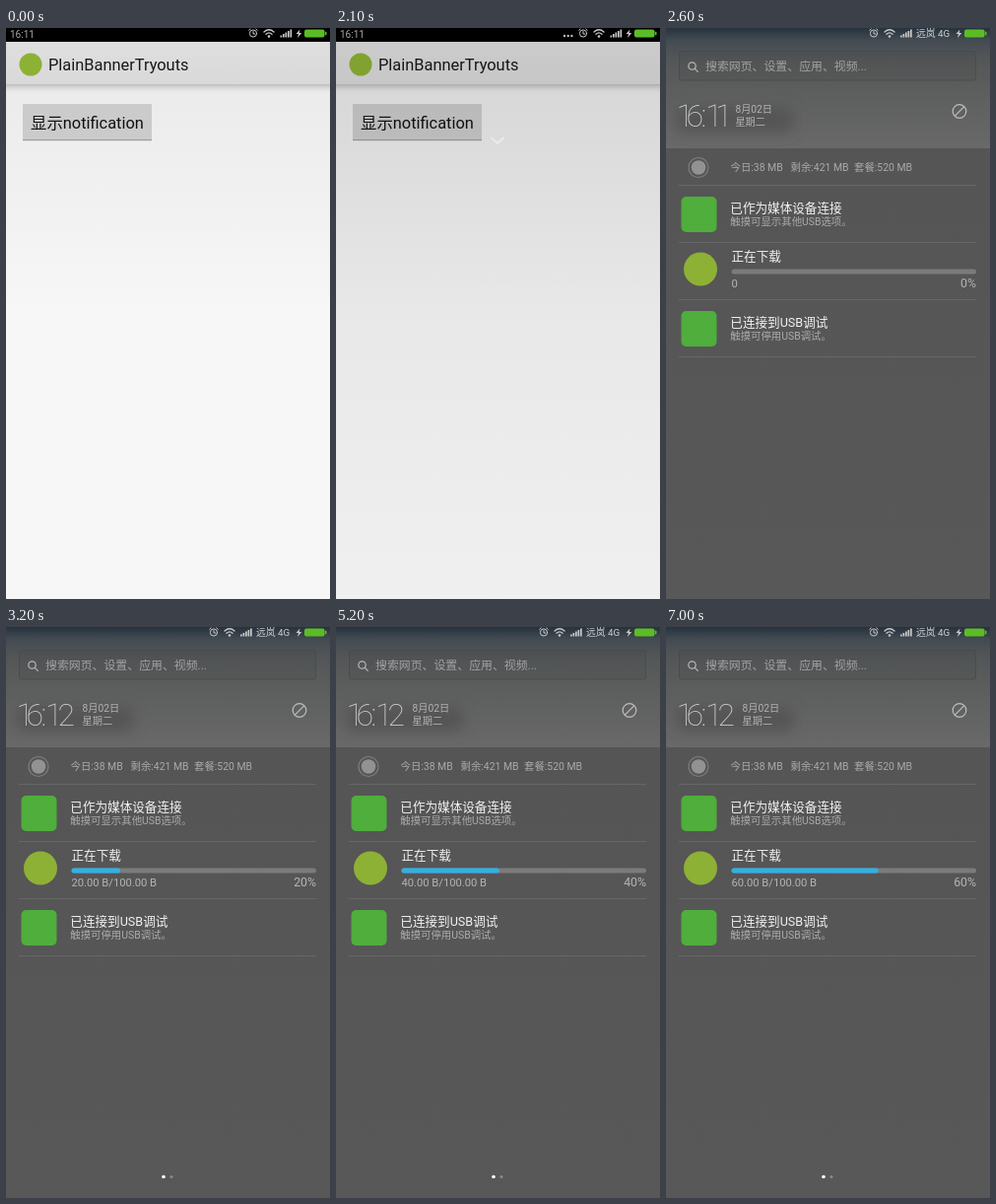
Animation, 329 px wide and 579 px high, one loop 8 s. Source, as an HTML page:

```html
<!DOCTYPE html>
<html lang="zh-CN">
<head>
<meta charset="utf-8">
<title>Notification shade</title>
<style>
  html, body { margin: 0; width: 100%; height: 100%; overflow: hidden; background: #f7f7f7; }
  svg { display: block; width: 100%; height: 100%; }
  text { font-family: Roboto, "Noto Sans CJK SC", "Noto Sans CJK", sans-serif; white-space: pre; }
  .head { font-size: 12.6px; fill: #f2f2f2; }
  .sub { font-size: 10.4px; fill: #fff; fill-opacity: .5; }
  .date { font-size: 10.2px; fill: #b2b2b2; }
  .clock { font-size: 32px; font-weight: 100; fill: #d2d2d2; }
  .line { fill: none; stroke-linecap: round; stroke-linejoin: round; }
</style>
</head>
<body>
<svg viewBox="0 0 329 579" preserveAspectRatio="none">
  <defs>
    <linearGradient id="page" x2="0" y2="1">
      <stop offset="0" stop-color="#e8e8e8"/><stop offset=".5" stop-color="#f7f7f7"/>
    </linearGradient>
    <linearGradient id="title" x2="0" y2="1">
      <stop offset="0" stop-color="#dfdfdf"/><stop offset="1" stop-color="#d9d9d9"/>
    </linearGradient>
    <linearGradient id="drop" x2="0" y2="1">
      <stop offset="0" stop-color="#bdbdbd"/><stop offset="1" stop-color="#e8e8e8" stop-opacity="0"/>
    </linearGradient>
    <linearGradient id="dimming" x2="0" y2="1">
      <stop offset="0" stop-opacity=".09"/><stop offset="1" stop-opacity=".03"/>
    </linearGradient>
    <linearGradient id="topShade" x2="0" y2="1">
      <stop offset="0" stop-color="#263441"/><stop offset="1" stop-color="#424c54"/>
    </linearGradient>
    <linearGradient id="headerFill" x2="0" y2="1">
      <stop offset="0" stop-color="#26323d"/><stop offset=".1" stop-color="#434b52"/>
      <stop offset=".25" stop-color="#535657"/><stop offset=".5" stop-color="#5c5d5d"/>
      <stop offset="1" stop-color="#696969"/>
    </linearGradient>
    <linearGradient id="panelFill" x2="0" y2="1">
      <stop offset="0" stop-color="#555"/><stop offset="1" stop-color="#585858"/>
    </linearGradient>
    <filter id="smudge" x="-50%" y="-100%" width="200%" height="300%"><feGaussianBlur stdDeviation="7"/></filter>
    <filter id="soft"><feGaussianBlur stdDeviation=".6"/></filter>

    <g id="alarm" class="line" stroke="#c8c8c8">
      <circle r="3.6"/><path d="M0-2V.5H1.8M-4.2-3.2L-2.8-4.5M4.2-3.2L2.8-4.5"/>
    </g>
    <g id="wifi" class="line" stroke="#c8c8c8" stroke-width="1.3">
      <path d="M-5-1.5Q0-6 5-1.5M-3 .8Q0-2 3 .8"/><circle cy="3" r=".7" fill="#c8c8c8"/>
    </g>
    <path id="signal" fill="#c8c8c8" d="M-6 2h1.7v2h-1.7zM-3.5 .5h1.7v3.5h-1.7zM-1-1h1.7v5h-1.7zM1.5-2.5h1.7v6.5h-1.7zM4-4h1.7v8h-1.7z"/>
    <g id="power">
      <path d="M298.5 1.5l-4 4.5h2.5l-1 4 4.3-5h-2.6z" fill="#c8c8c8"/>
      <rect x="303" y="1.5" width="20.5" height="8" rx="2" fill="#5bbd25"/>
      <rect x="324" y="3.8" width="1.5" height="3.4" fill="#5bbd25"/>
    </g>
  </defs>

  <g id="app">
    <rect width="329" height="579" fill="url(#page)"/>
    <rect y="57" width="329" height="10" fill="url(#drop)"/>
    <rect y="14" width="329" height="43" fill="url(#title)"/>
    <circle cx="25" cy="37" r="11.5" fill="#8db135"/>
    <text x="43" y="43" font-size="16.4" fill="#181818">PlainBannerTryouts</text>
    <rect x="17" y="77" width="131" height="37" rx="1" fill="#cbcbcb"/>
    <rect x="17" y="113" width="131" height="1.2" fill="#9c9c9c"/>
    <text x="25" y="102" font-size="16.4" fill="#111">显示notification</text>
    <rect id="dim" width="329" height="579" fill="url(#dimming)"/>
    <g id="statusBar">
      <rect width="329" height="14"/>
      <text x="4" y="9.5" font-size="10" fill="#aaa">16:11</text>
      <g id="more" fill="#bbb">
        <circle cx="232" cy="8" r="1.2"/><circle cx="235.7" cy="8" r="1.2"/><circle cx="239.4" cy="8" r="1.2"/>
      </g>
      <use href="#alarm" x="251" y="5.5"/>
      <use href="#wifi" x="267" y="5.5"/>
      <use href="#signal" x="284.5" y="5.5"/>
      <use href="#power"/>
    </g>
  </g>

  <g id="veil">
    <rect width="329" height="579" fill="#5a5a5a" opacity=".75"/>
    <rect width="329" height="14" fill="url(#topShade)"/>
  </g>

  <g id="panel">
    <rect width="329" height="122" fill="url(#headerFill)"/>
    <rect x="10" y="80" width="120" height="26" rx="10" fill="#555" filter="url(#smudge)"/>
    <rect y="122" width="329" height="457" fill="url(#panelFill)"/>
    <use href="#alarm" x="211" y="5.5"/>
    <use href="#wifi" x="227" y="5.5"/>
    <use href="#signal" x="244" y="5.5"/>
    <text x="254" y="9.3" font-size="9.8" fill="#d0d0d0">远岚 4G</text>
    <use href="#power"/>
    <rect x="13.5" y="23.5" width="301" height="29.5" rx="2" fill="#000" fill-opacity=".04" stroke="#464a48" stroke-opacity=".75"/>
    <g class="line" stroke="#b8b8b8" stroke-width="1.2"><circle cx="26.5" cy="38.5" r="3.7"/><path d="M29.3 41.3l3 3"/></g>
    <text x="40" y="42.6" font-size="11.9" fill="#a2a2a2">搜索网页、设置、应用、视频...</text>
  </g>

  <g id="shade">
    <text id="clock" class="clock" y="100"></text>
    <g id="date" class="date"><text y="86">8月02日</text><text y="98.5">星期二</text></g>
    <g class="line" stroke="#bdbdbd" stroke-width="1.2"><circle cx="298" cy="84.5" r="6.8"/><path d="M293.4 89.1l9.2-9.2"/></g>
    <path d="M13 159.5H315M13 217.5H315M13 275.5H315M13 333.5H315" stroke="#fff" stroke-opacity=".1"/>
    <circle cx="33" cy="141.5" r="10" fill="none" stroke="#7d7d7d" stroke-width="1.2"/>
    <circle cx="33" cy="141.5" r="7.3" fill="#929292"/>
    <g class="sub">
      <text x="65.5" y="145.3">今日:38 MB</text><text x="126.5" y="145.3">剩余:421 MB</text><text x="191" y="145.3">套餐:520 MB</text>
    </g>
    <rect x="15.5" y="171" width="36" height="36" rx="5" fill="#4fae3c"/>
    <text class="head" x="65.3" y="187.3">已作为媒体设备连接</text>
    <text class="sub" x="65.3" y="200.3">触摸可显示其他USB选项。</text>
    <circle cx="35" cy="244.5" r="17" fill="#8db135"/>
    <text class="head" x="66.5" y="236.3">正在下载</text>
    <rect x="66.5" y="244.5" width="248.5" height="5" rx="2.5" fill="#7b7b7b"/>
    <rect id="bar" x="66.5" y="244.5" height="5" rx="2.5" fill="#30b1e3"/>
    <g fill="#b4b4b4">
      <text id="bytes" x="66.5" y="263" font-size="11.2"></text>
      <text id="percent" x="315" y="263" font-size="12.3" text-anchor="end"></text>
    </g>
    <rect x="15.5" y="287" width="36" height="36" rx="5" fill="#4fae3c"/>
    <text class="head" x="65.3" y="303">已连接到USB调试</text>
    <text class="sub" x="65.3" y="316">触摸可停用USB调试。</text>
  </g>

  <path id="handle" class="line" d="M-6-2.5L0 3L6-2.5" stroke="#fff" stroke-opacity=".45" stroke-width="2"/>
  <g id="pages"><circle cx="160" cy="557.5" r="1.8" fill="#fff"/><circle cx="168" cy="557.5" r="1.5" fill="#8c8c8c"/></g>
</svg>
<script>
const LOOP = 8000;
const el = id => document.getElementById(id);
const show = (id, on) => { el(id).style.display = on ? '' : 'none'; };

// Each step inherits what it does not change.
const steps = [
  { at: 0, stage: 'app', more: false, handle: 0, shift: 0, minute: 11, progress: 0, pages: 0 },
  { at: 1500, more: true },
  { at: 2100, stage: 'pull', handle: 114 },
  { at: 2300, stage: 'veil', handle: 504.5, shift: -53.5 },
  { at: 2600, stage: 'open', handle: 0, shift: 0 },
  { at: 2700, minute: 12, progress: 10, pages: .5 },
  { at: 2800, pages: 1 },
  { at: 3200, progress: 20 },
  { at: 4200, progress: 30 },
  { at: 5200, progress: 40 },
  { at: 6000, progress: 50 },
  { at: 7000, progress: 60 }
];
steps.forEach((step, i) => { steps[i] = { ...steps[i - 1], ...step }; });

function draw({ stage, more, handle, shift, minute, progress, pages }) {
  const veiled = stage === 'veil', open = stage === 'open';
  show('app', !open);
  show('dim', stage !== 'app');
  show('statusBar', !veiled);
  show('more', more);
  show('veil', veiled);
  show('panel', open);
  show('shade', veiled || open);
  show('handle', handle > 0);
  el('app').setAttribute('filter', veiled ? 'url(#soft)' : 'none');
  el('handle').setAttribute('transform', `translate(164 ${handle})`);
  el('shade').setAttribute('transform', `translate(0 ${shift})`);
  el('pages').style.opacity = pages;

  // The thin digits are set with proportional spacing.
  el('clock').setAttribute('x', `10.5 20.5 35.5 40 ${minute === 11 ? 50 : 52.5}`);
  el('clock').textContent = `16:${minute}`;
  el('date').setAttribute('transform', `translate(${minute === 11 ? 70.4 : 77.6} 0)`);

  el('bar').setAttribute('width', 248.5 * progress / 100);
  el('bytes').textContent = progress ? `${progress.toFixed(2)} B/100.00 B` : '0';
  el('percent').textContent = `${progress}%`;
}

let current;
function tick() {
  const time = performance.now() % LOOP;
  const step = steps.filter(s => s.at <= time).pop();
  if (step !== current) draw(current = step);
  requestAnimationFrame(tick);
}
tick();
</script>
</body>
</html>
```
